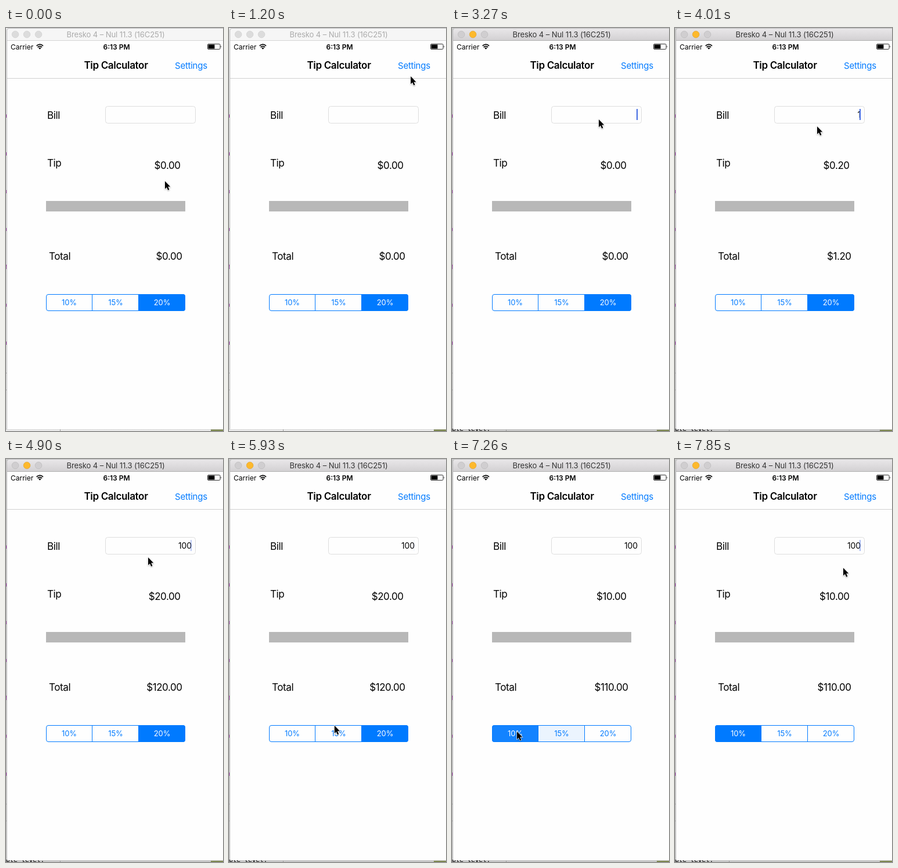
Write an HTML page that moves like this. It is 374 px wide and 692 px high and loops after 8 s.

```html
<!DOCTYPE html>
<html lang="en">
<head>
<meta charset="utf-8">
<title>Tip Calculator</title>
<style>
  html, body { margin: 0; width: 100%; height: 100%; overflow: hidden; background: #fefefe; }
  svg { display: block; width: 374px; height: 692px; }
  text { font: 17px Inter, "Liberation Sans", sans-serif; letter-spacing: -.41px; }
  .bold { font-weight: 600; }
  .end { text-anchor: end; }
  .mid { text-anchor: middle; }
  .status { font-size: 12px; letter-spacing: 0; }
  .small text, .small { font-size: 13px; letter-spacing: -.08px; }
  .code { font: 11px "DejaVu Sans Mono", monospace; letter-spacing: 0; }
</style>
</head>
<body>
<svg viewBox="0 0 374 692">
  <defs>
    <linearGradient id="bar" x2="0" y2="1">
      <stop stop-color="#e9e7e9"/><stop offset="1" stop-color="#d2d0d2"/>
    </linearGradient>
    <linearGradient id="shade" x2="0" y2="1">
      <stop stop-color="#999"/><stop offset="1" stop-color="#ccc"/>
    </linearGradient>
    <clipPath id="pill"><rect x="69" y="457" width="240" height="29" rx="4"/></clipPath>
    <filter id="soft" x="-50%" y="-50%" width="200%" height="200%">
      <feDropShadow dx="0" dy="1" stdDeviation="1" flood-opacity=".35"/>
    </filter>
  </defs>

  <!-- desktop behind the window -->
  <rect id="desk" width="374" height="692"/>
  <g id="scraps" fill="#94259e"></g>
  <path d="M93.5 688V692M0 592.5H2M0 621.5H2" stroke="#999"/>
  <path d="M353 688H374V692H353Z" fill="#7d8850"/>
  <rect id="shadow" y="688" width="374" height="2" fill="url(#shade)"/>
  <text id="note" class="code" x="0" y="692" font-weight="700">ble level.</text>

  <!-- window -->
  <path d="M2 689V5Q2 1 6 1H374V689Z" fill="#fefefe"/>
  <path id="titlebar" d="M2 21.5V5Q2 1 6 1H374V21.5Z"/>
  <path id="rule" d="M2 21.5H374"/>
  <path d="M1.5 688V5Q1.5 .5 6 .5H374" fill="none" stroke="#bbb"/>
  <g id="lights" stroke-width=".7"></g>
  <text id="title" class="mid small" x="189" y="16">Bresko 4 – Nul 11.3 (16C251)</text>

  <!-- status and navigation bars -->
  <text class="status" x="8" y="37">Carrier</text>
  <path d="M52.6 30.6Q58.3 25.6 64 30.6M54.6 33Q58.3 29.8 62 33" fill="none" stroke="#000" stroke-width="1.8"/>
  <path d="M56 34.3Q58.3 32.6 60.6 34.3L58.3 36.8Z"/>
  <text class="status bold mid" x="190.5" y="37">6:13 PM</text>
  <rect x="347.5" y="27.5" width="21.5" height="9" rx="1.5" fill="none" stroke="#000" stroke-width=".8"/>
  <path d="M348.5 28.5H359.5V35.5H348.5ZM370 30.3Q371.8 32 370 33.7Z"/>
  <text class="bold mid" x="189.5" y="70" style="letter-spacing:-.33px">Tip Calculator</text>
  <text x="291" y="70" fill="#007aff" style="font-size:15px;letter-spacing:-.24px">Settings</text>
  <path d="M2 86.5H374" stroke="#d0d0d0"/>

  <!-- form -->
  <text x="71" y="156">Bill</text>
  <rect x="171.5" y="134.5" width="155" height="29" rx="4" fill="#fefefe" stroke="#dedede"/>
  <text id="bill" class="end" x="320" y="154" style="font-size:14px;letter-spacing:-.15px"></text>
  <rect id="caret" x="318" y="139" width="2" height="19" fill="#4169e1"/>
  <text x="71" y="238">Tip</text>
  <text id="tip" class="end" x="300.7" y="242"></text>
  <rect x="69" y="297" width="240" height="18" fill="#b8b8b8"/>
  <text x="74" y="398">Total</text>
  <text id="total" class="end" x="303.7" y="398"></text>

  <g class="small">
    <g id="fills" fill="#007aff" clip-path="url(#pill)"></g>
    <rect x="69.5" y="457.5" width="239" height="28" rx="3.5" fill="none" stroke="#007aff"/>
    <path d="M148.5 458V485M228.5 458V485" stroke="#007aff"/>
    <g id="rates"></g>
  </g>

  <path id="cursor" d="M0 0V13.2L3 10.4L5.2 15.4L7.4 14.5L5.2 9.6H9.3Z" stroke="#fff" stroke-width="1.1" paint-order="stroke" filter="url(#soft)"/>
</svg>
<script>
const $ = id => document.getElementById(id);
const LOOP = 8000, TICK = 148.6;   // the screen is refreshed once per tick

// moments, in ticks
const ACTIVE = 16, FOCUS = 19, TYPE = 27, PICK_15 = 41, PICK_10 = 48;

const start = [274, 263];
const moves = [   // from tick, to tick, end point
  [0, 5, 316, 97], [7, 10, 311, 72], [10, 15, 262, 135], [21, 22, 253, 157],
  [22, 25, 245, 169], [35, 41, 180, 466], [43, 47, 112, 468], [49, 53, 290, 187]
];

const clamp = v => Math.max(0, Math.min(1, v));
const easeOut = p => 1 - (1 - p) ** 2;
const money = v => "$" + v.toFixed(2);
const repeat = (id, items, make) => $(id).innerHTML = [...items].map(make).join("");

repeat("scraps", "noBopnn", (c, i) => `<text class="code" x="-4.5" y="${544 - 65 * i}">${c}</text>`);
repeat("lights", "123", (_, i) => `<circle cx="${16 + 20 * i}" cy="11" r="5.8"/>`);
repeat("fills", "123", (_, i) => `<rect x="${68.5 + 80 * i}" y="457" width="80.5" height="29"/>`);
repeat("rates", [10, 15, 20], (r, i) => `<text class="mid" x="${109 + 80 * i}" y="476">${r}%</text>`);

function pointer(n) {
  return moves.reduce(([x, y], [from, to, endX, endY]) => {
    const p = easeOut(clamp((n - from) / (to - from)));
    return [x + (endX - x) * p, y + (endY - y) * p];
  }, start);
}

// the blink restarts with the last key typed
function caretAlpha(n) {
  if (n < FOCUS) return 0;
  const since = n < TYPE ? n - FOCUS : Math.max(0, n - TYPE - 2);
  return clamp((4.3 - since % 6.7) * 1 + .05);
}

// selection cross-fade
const fade = (n, from) => n < from ? 0 : 1 - .5 * .15 ** (n - from);

function showWindow(active) {
  $("desk").setAttribute("fill", active ? "#c9c9c9" : "#ececec");
  $("shadow").setAttribute("opacity", active ? 1 : .5);
  $("note").setAttribute("opacity", active ? 1 : 0);
  $("titlebar").setAttribute("fill", active ? "url(#bar)" : "#f6f6f6");
  $("rule").setAttribute("stroke", active ? "#b1b1b1" : "#d4d4d4");
  $("title").setAttribute("fill", active ? "#333" : "#aaa");
  [...$("lights").children].forEach((dot, i) => {
    const lit = active && i === 1;
    dot.setAttribute("fill", lit ? "#fdb92c" : active ? "#d0ced0" : "#dcdcdc");
    dot.setAttribute("stroke", lit ? "#e0a028" : active ? "#bbb9bb" : "#cecece");
  });
}

function draw(now) {
  const n = Math.floor((now % LOOP + 30) / TICK);
  showWindow(n >= ACTIVE);

  const bill = "100".slice(0, Math.max(0, n - TYPE + 1));
  const rate = n >= PICK_10 ? .10 : n >= PICK_15 ? .15 : .20;
  $("bill").textContent = bill;
  $("tip").textContent = money(bill * rate);
  $("total").textContent = money(bill * (1 + rate));
  $("caret").setAttribute("opacity", caretAlpha(n));

  const to15 = fade(n, PICK_15), to10 = fade(n, PICK_10);
  [to10, to15 - to10, 1 - to15].forEach((w, i) => {
    $("fills").children[i].setAttribute("opacity", clamp(w));
    $("rates").children[i].setAttribute("fill", w >= .5 ? "#fff" : "#007aff");
  });

  $("cursor").setAttribute("transform", `translate(${pointer(n)})`);
  requestAnimationFrame(() => draw(performance.now()));
}
draw(0);
</script>
</body>
</html>
```
